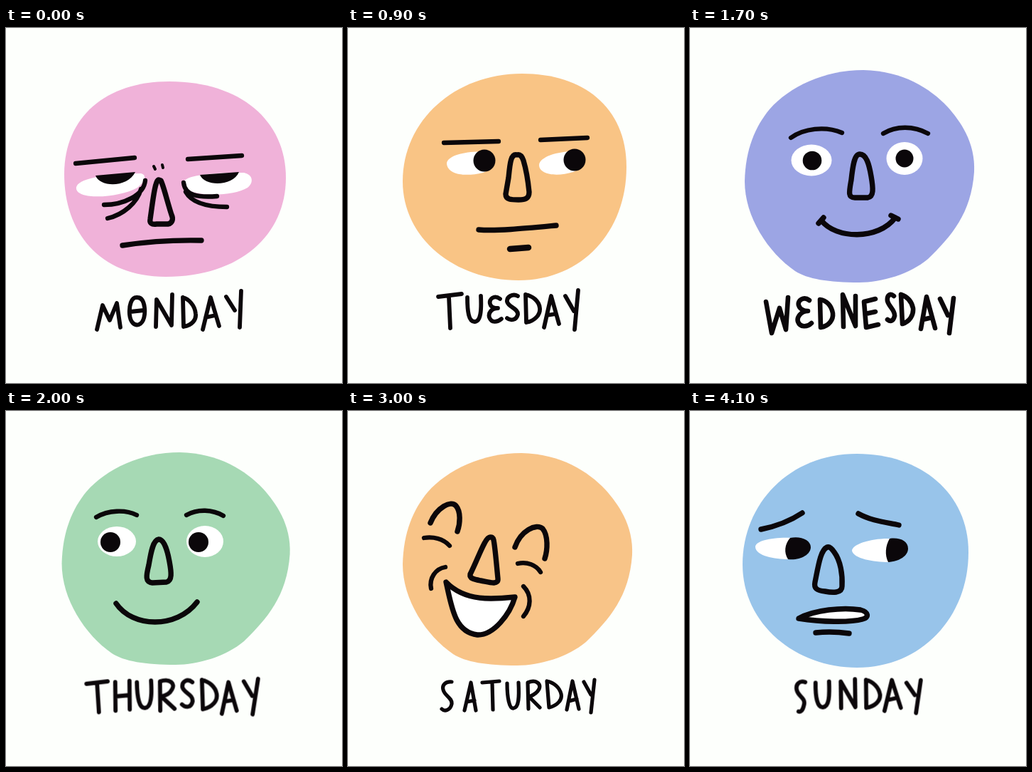
An HTML page for the animation above (4.2 s loop, 473 by 498 pixels).

```html
<!DOCTYPE html>
<html lang="en">
<head>
<meta charset="utf-8">
<title>Week of moods</title>
<style>
html, body { margin: 0; width: 100%; height: 100%; overflow: hidden; background: #fdfffc; }
svg { display: block; width: 473px; height: 498px; }

.day { visibility: hidden; animation: day 4.2s step-end infinite; animation-delay: calc(var(--i) * .6s - 4.2s); }
@keyframes day {
  0% { visibility: visible; }
  14.2857%, 100% { visibility: hidden; }
}

.ink, .word { fill: none; stroke: #0b070a; stroke-width: 7.4; stroke-linecap: round; stroke-linejoin: round; }
.fine { stroke-width: 6.3; }
.word { stroke-width: var(--pen, 5.8); }
.eye, .teeth { fill: #fff; }
.pupil { fill: #0b070a; }

/* hand-drawn wobble of the lettering */
.word path { --s: 1; transform-box: fill-box; transform-origin: center; animation: boil .3s step-end infinite; animation-delay: var(--shift, 0s); }
.word path:nth-child(even) { --s: -1; }
@keyframes boil {
  0% { transform: none; }
  33.333% { transform: translate(calc(var(--s) * .6px), calc(var(--s) * -.5px)) rotate(calc(var(--s) * 1deg)); }
  66.666% { transform: translate(calc(var(--s) * -.5px), calc(var(--s) * .5px)) rotate(calc(var(--s) * -.8deg)); }
}
</style>
</head>
<body>
<svg viewBox="0 0 473 498">
  <defs>
    <path id="round" d="M77 215C78 170 92 138 112 114C140 82 190 59 244 59C300 60 338 85 362 110C380 130 402 160 400 202C396 260 368 292 335 324C310 345 270 357 238 357C195 357 165 352 148 341C110 315 77 265 77 215Z"/>
  </defs>

  <g class="day" style="--i:0" role="img" aria-label="Monday">
    <path fill="#f0b2d9" d="M82 205C82 125 140 75 230 75C330 75 394 130 394 210C394 290 330 349 225 349C130 349 82 285 82 205Z"/>
    <path class="eye" d="M99 226C97 214 125 205 190 204C198 206 197 214 185 224C160 238 103 242 99 226ZM250 215C258 206 290 203 335 203C348 206 349 217 340 224C320 236 275 236 258 228C252 224 248 220 250 215Z"/>
    <path class="pupil" d="M126 207C132 224 172 224 182 202ZM273 206C280 223 320 222 328 202Z"/>
    <g class="ink">
      <path class="fine" d="M98 190L181 182M256 184L332 179M196 214C194 235 165 248 138 248M190 226C185 245 165 262 143 267M250 217C252 235 270 238 297 236M253 230C262 246 285 251 311 251"/>
      <path style="stroke-width:4" d="M208 194l2 4M220 192l1 4"/>
      <path d="M215 213C210 213 207 240 203 268C202 274 205 276 212 275L228 275C234 274 236 268 233 262C226 240 222 222 218 214Z"/>
      <path d="M164 305C190 301 230 297 275 298"/>
    </g>
    <g class="word">
      <path d="M128 423L136 389L146 410L156 386L161 420"/>
      <path d="M185 378C176 377 173 390 174 402C175 413 181 418 187 416C195 413 196 400 195 392C194 384 191 378 185 378M175 398L194 396"/>
      <path d="M211 419L212 381L233 417L234 374"/>
      <path d="M249 378L250 419C262 417 268 409 267 401C266 389 257 380 249 378"/>
      <path d="M277 423L288 378L300 418M281 406L295 403"/>
      <path d="M310 377L322 396M331 369L329 420"/>
    </g>
  </g>

  <g class="day" style="--i:1" role="img" aria-label="Tuesday">
    <path fill="#f9c485" d="M77 215C77 130 150 64 245 64C330 64 392 110 392 195C392 285 330 354 240 354C150 354 77 295 77 215Z"/>
    <path class="eye" d="M139 190C140 178 170 172 195 174C205 180 205 198 190 203C165 209 140 206 139 190ZM269 192C270 180 298 172 322 173C332 179 331 197 317 202C294 209 269 206 269 192Z"/>
    <g class="pupil"><circle cx="192" cy="186" r="15.5"/><circle cx="319" cy="185" r="15.5"/></g>
    <g class="ink">
      <path class="fine" d="M135 161L212 159M271 157L337 154"/>
      <path d="M238 178C229 176 228 190 226 210L222 233C222 241 230 241 240 241C250 241 255 239 255 230C253 210 250 196 247 186C245 180 242 177 238 178Z"/>
      <path d="M184 283C210 285 250 281 293 277"/>
      <path style="stroke-width:8.5" d="M228 310L254 308"/>
    </g>
    <g class="word">
      <path d="M127 377L160 373M142 377L144 421"/>
      <path d="M168 378C168 398 170 412 178 412C187 412 188 396 187 376"/>
      <path d="M214 380C206 374 198 380 200 387C201 392 207 393 211 393C202 393 197 400 199 406C202 414 210 413 216 408"/>
      <path d="M239 376C232 372 223 377 224 384C226 392 240 393 239 402C237 410 229 411 224 407"/>
      <path d="M250 374L251 413C263 411 271 402 270 393C269 383 260 376 250 374"/>
      <path d="M276 420L286 376L297 415M280 403L293 401"/>
      <path d="M306 376L318 397M324 368L319 423"/>
    </g>
  </g>

  <g class="day" style="--i:2;--shift:-.1s;--pen:6.6" role="img" aria-label="Wednesday">
    <use href="#round" fill="#9ca5e4"/>
    <g class="eye"><ellipse cx="171" cy="185.5" rx="28.5" ry="22"/><ellipse cx="302" cy="183" rx="25.5" ry="23"/></g>
    <g class="pupil"><circle cx="172" cy="186" r="13.3"/><circle cx="302" cy="183" r="12.5"/></g>
    <g class="ink">
      <path class="fine" d="M142 154C160 141 190 137 214 147M272 148C290 137 315 137 335 148"/>
      <path d="M239 177C231 177 229 195 227 213C224 230 222 238 232 238L250 238C259 237 258 225 255 208C252 190 248 177 239 177Z"/>
      <path d="M185 270C205 296 265 298 289 266M181 274L188 266M283 263L293 268"/>
    </g>
    <g class="word">
      <path d="M107 384L115 428L126 393L135 423L138 378"/>
      <path d="M168 382C160 376 151 382 153 389C155 395 161 397 166 397C156 397 150 406 152 412C155 420 165 420 171 414"/>
      <path d="M183 381L184 420C196 418 202 409 201 400C199 389 192 382 183 381"/>
      <path d="M216 419L215 374L233 418L233 376"/>
      <path d="M261 380L245 384L248 420L265 416M247 401L261 398"/>
      <path d="M287 376C281 371 277 376 278 383C280 391 289 396 288 404C286 412 282 412 278 409"/>
      <path d="M297 374L299 415C309 412 315 403 314 393C312 384 306 377 297 374"/>
      <path d="M325 422L333 377L345 421M328 409L341 406"/>
      <path d="M352 380L363 403M371 379L365 428"/>
    </g>
  </g>

  <g class="day" style="--i:3" role="img" aria-label="Thursday">
    <use href="#round" fill="#a6d9b4" transform="translate(2 -1) scale(.994 1)"/>
    <g class="eye"><ellipse cx="156" cy="183" rx="27" ry="21"/><ellipse cx="280" cy="183" rx="26" ry="22"/></g>
    <g class="pupil"><circle cx="147" cy="184" r="14"/><circle cx="271" cy="184" r="14"/></g>
    <g class="ink">
      <path class="fine" d="M127 149C144 139 168 138 184 146M254 146C270 137 291 138 306 147"/>
      <path d="M215 180C207 181 204 198 201 216C197 232 196 240 206 241L226 240C234 238 233 227 230 211C227 194 222 180 215 180Z"/>
      <path d="M155 270C178 304 240 306 269 268"/>
    </g>
    <g class="word">
      <path d="M114 382L144 379M129 382L131 422"/>
      <path d="M153 381L154 421M173 379L174 419M154 401L173 399"/>
      <path d="M185 380C185 402 188 417 196 416C205 415 206 398 205 378"/>
      <path d="M217 421L216 380C230 375 238 383 233 391C230 397 224 400 218 401L237 418"/>
      <path d="M263 380C256 374 248 379 249 387C251 395 264 397 263 407C261 416 253 416 248 411"/>
      <path d="M275 378L277 419C290 416 298 407 296 397C294 387 285 380 275 378"/>
      <path d="M304 424L314 380L325 420M308 407L321 405"/>
      <path d="M334 380L346 400M354 376L347 426"/>
    </g>
  </g>

  <g class="day" style="--i:4" role="img" aria-label="Friday">
    <path fill="#f0e48f" d="M85 200C85 125 140 70 228 70C325 70 398 115 398 198C398 285 330 345 225 345C130 345 85 285 85 200Z"/>
    <path class="eye" d="M268 172C245 169 229 177 229 188C230 202 250 210 268 209Z"/>
    <path class="pupil" d="M266 172C256 182 256 198 266 209C280 209 291 200 291 190C291 179 280 171 266 172Z"/>
    <g class="ink">
      <path d="M118 166C134 167 150 173 163 180C148 183 132 187 116 192"/>
      <path d="M195 194C188 196 184 212 180 228C175 240 174 248 182 250C192 253 204 254 213 251C220 247 217 238 214 229C210 214 204 196 195 194Z"/>
      <path d="M129 266C148 305 225 318 257 274"/>
      <path d="M171 317C180 319 190 319 199 319"/>
    </g>
    <g class="word">
      <path d="M176 378L152 381M155 381L157 424M156 402L174 399"/>
      <path d="M193 422L191 382C204 376 212 383 209 391C206 397 200 400 194 402L213 418"/>
      <path d="M229 389L229 416M227 374L227 375"/>
      <path d="M244 378L246 420C259 417 267 408 265 398C263 388 254 380 244 378"/>
      <path d="M275 421L285 379L296 418M279 406L292 403"/>
      <path d="M303 381L315 399M323 377L318 424"/>
    </g>
  </g>

  <g class="day" style="--i:5;--pen:5.2" role="img" aria-label="Saturday">
    <use href="#round" fill="#f8c488"/>
    <g class="ink">
      <path d="M116 157C125 135 145 125 152 133C159 141 158 158 154 169M235 191C243 168 265 157 274 165C282 175 281 195 277 207"/>
      <path class="fine" d="M107 178C120 176 134 179 143 189M239 214C252 211 265 216 271 226M137 219C123 221 114 235 117 249M247 246C259 258 258 275 247 288"/>
      <path d="M200 177C193 177 184 205 172 229C171 235 177 236 187 238C198 240 212 245 211 235C209 215 207 190 205 181C204 177 203 177 200 177Z"/>
      <path class="teeth" d="M138 240C165 268 205 264 235 261C228 285 205 315 182 314C150 310 146 275 138 240Z"/>
    </g>
    <g class="word">
      <path d="M146 380C138 379 132 384 134 391C136 400 147 402 146 411C144 420 136 422 132 418"/>
      <path d="M164 420L173 381L180 420M167 408L178 406"/>
      <path d="M189 381L213 379M203 381L204 419"/>
      <path d="M224 382C224 402 227 418 233 417C241 416 241 400 240 381"/>
      <path d="M254 418L253 381C265 376 272 383 269 390C266 396 260 399 255 401L270 416"/>
      <path d="M280 379L283 416C295 413 302 405 300 397C298 388 290 381 280 379"/>
      <path d="M308 419L316 379L325 418M311 407L322 404"/>
      <path d="M332 380L342 398M347 377L342 423"/>
    </g>
  </g>

  <g class="day" style="--i:6" role="img" aria-label="Sunday">
    <path fill="#98c4ea" d="M74 215C74 130 140 60 235 60C325 60 392 115 392 198C392 290 325 360 235 360C150 360 74 300 74 215Z"/>
    <path class="eye" d="M142 178C116 177 92 182 92 191C93 203 118 208 140 208ZM283 179C255 178 228 187 228 196C230 207 258 212 280 212Z"/>
    <path class="pupil" d="M141 178C133 187 132 199 138 208C154 210 170 202 170 191C170 181 156 175 141 178ZM281 179C275 189 274 202 279 212C295 211 307 203 307 193C307 182 295 177 281 179Z"/>
    <g class="ink">
      <path d="M100 166C120 162 140 155 158 143M237 144C255 154 275 156 294 160"/>
      <path d="M193 191C184 195 181 215 176 240C174 249 179 252 190 253C200 255 214 256 214 246C215 230 212 210 203 198C199 192 196 190 193 191Z"/>
      <path class="teeth" d="M153 291C175 279 215 275 240 279C252 282 252 290 243 292C225 297 185 296 153 291Z"/>
      <path d="M177 311C195 309 210 310 224 312"/>
    </g>
    <g class="word">
      <path d="M163 380C155 377 149 383 151 391C153 400 163 402 161 411C159 420 156 422 153 421"/>
      <path d="M176 382C176 402 179 417 187 416C196 415 196 399 195 380"/>
      <path d="M213 416L213 379L233 415L233 376"/>
      <path d="M247 378L248 417C260 415 268 407 267 398C265 388 257 380 247 378"/>
      <path d="M274 420L285 377L297 416M278 405L292 402"/>
      <path d="M304 382L316 399M324 378L318 424"/>
    </g>
  </g>
</svg>
</body>
</html>
```
